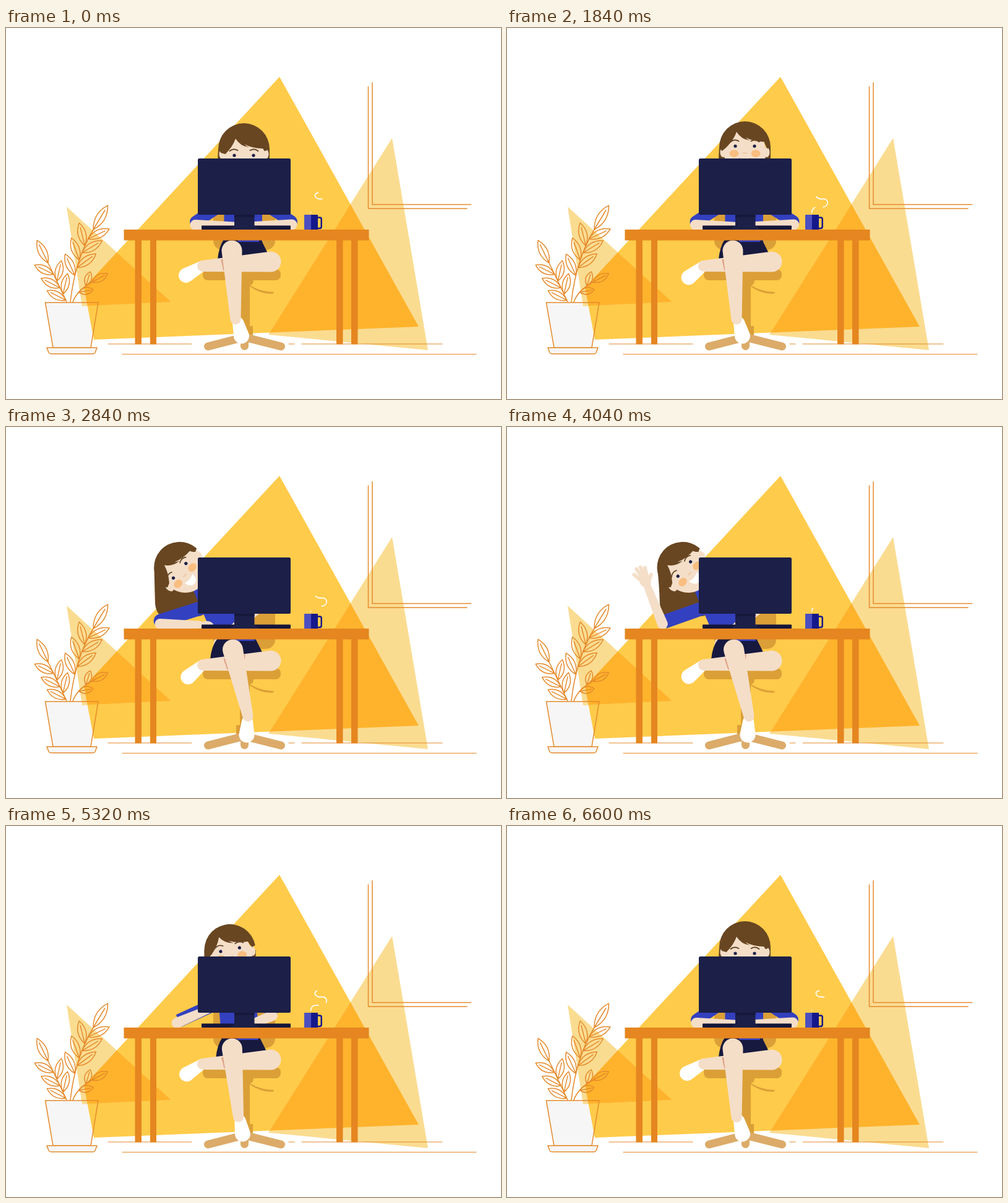
Animation, 800 px wide and 600 px high, one loop 6640 ms. Source, as an HTML page:

```html
<!DOCTYPE html>
<html lang="en">
<head>
<meta charset="utf-8">
<title>At the desk</title>
<style>
html, body { margin: 0; width: 100%; height: 100%; overflow: hidden; background: #fff; }
svg { display: block; width: 800px; height: 600px; }
.line { fill: none; stroke: #e58a2b; stroke-width: 1.5; stroke-linecap: round; stroke-linejoin: round; }
</style>
</head>
<body>
<svg viewBox="0 0 800 600">
  <defs><clipPath id="big"><path d="M442 79 667 483 142 504 126 420Z"/></clipPath></defs>

  <path fill="#f6f6f6" d="M63.5 444H149L137 517H76Z"/>
  <path fill="#ffcb4a" d="M442 79 667 483 142 504 126 420Z"/>
  <path fill="#fadc91" d="M624 178 682 521 424 496ZM98 289 267 443 123 450Z"/>
  <path fill="#ffb32c" clip-path="url(#big)" d="M624 178 682 521 424 496ZM98 289 267 443 123 450Z"/>

  <g class="line">
    <path d="M585.5 95V292H745M592 88.5V285.5H751.5"/>
    <path stroke-width="1.2" d="M188 527.5H760M165 511H300M457 511H466M478 511H705"/>
    <path d="M63.5 444H149L137 517H76Z"/>
    <path fill="#f6f6f6" d="M66 517H147L144 525Q143 527 141 527H73Q70 527 69 525Z"/>
    <g id="plant"></g>
  </g>

  <rect x="335" y="280" width="100" height="79" rx="15" fill="#db9f37"/>
  <g id="body"></g>
  <g fill="#db9f37">
    <rect x="318" y="390" width="126" height="18" rx="8"/>
    <path d="M378 400H394V408H400Q400 415 394 416Q412 427 433 427L432 429.5Q412 431 394 418V482H399V497H372V482H378Z"/>
  </g>
  <path fill="none" stroke="#dcab69" stroke-width="13" stroke-linecap="round" d="M326.5 515 385 500 444.5 515M385.5 502V514.5"/>
  <g id="legs"></g>

  <path fill="#e58620" d="M190.5 326H586.5V343.5H568.5V511.5H558V343.5H544.5V511.5H534V343.5H243V511.5H233V343.5H219V511.5H208.5V343.5H190.5Z"/>
  <rect x="316" y="319.5" width="144" height="6.5" rx="1" fill="#14163a"/>
  <path fill="#1c1f47" d="M369 300H401.5V320L410 326H361L369 320Z"/>
  <path fill="#16183c" d="M369 302H401.5V306H369Z"/>
  <rect x="310" y="211" width="150" height="91" rx="2.5" fill="#1c1f47"/>
  <path fill="#4b4fc0" d="M482 302H493V326H482Z"/>
  <path fill="#15188a" d="M493 302H504V326H493Z"/>
  <path fill="none" stroke="#15188a" stroke-width="2.5" d="M503 306.5H507Q509.7 306.5 509.7 309V321Q509.7 324 507 324H503"/>
  <g id="steam" fill="none" stroke="#fffaf0" stroke-width="1.8" stroke-linecap="round"></g>
</svg>
<script>
const LOOP = 6640, SKIN = '#f4dec8', HAIR = '#684621', BLUE = '#3340bf', NAVY = '#17193f';
const $ = id => document.getElementById(id);
const mix = (a, b, p) => a + (b - a) * p;
const clamp = x => Math.min(1, Math.max(0, x));

function ease(t, from, to) {
  const x = clamp((t - from) / (to - from));
  return x * x * (3 - 2 * x);
}
// Rises to 1 between a and b, falls back to 0 between c and d
const hold = (t, a, b, c, d) => ease(t, a, b) - ease(t, c, d);
// 0 at the start of the loop, 1 halfway through each beat
const beat = (t, period) => (1 - Math.cos(2 * Math.PI * t / period)) / 2;

const stroke = (d, color, w, cap = 'round') =>
  `<path d="${d}" fill="none" stroke="${color}" stroke-width="${w}" stroke-linecap="${cap}"/>`;
const oval = (x, y, rx, ry, fill) => `<ellipse cx="${x}" cy="${y}" rx="${rx}" ry="${ry}" fill="${fill}"/>`;

// Tapered limb with round ends
function limb(x0, y0, r0, x1, y1, r1, fill) {
  const a = Math.atan2(y1 - y0, x1 - x0);
  const b = Math.acos((r0 - r1) / Math.hypot(x1 - x0, y1 - y0));
  const at = (x, y, r, s) => `${x + r * Math.cos(a + s * b)} ${y + r * Math.sin(a + s * b)}`;
  return `<path fill="${fill}" d="M${at(x0, y0, r0, 1)}A${r0} ${r0} 0 ${+(r0 > r1)} 1 ${at(x0, y0, r0, -1)}` +
    `L${at(x1, y1, r1, -1)}A${r1} ${r1} 0 ${+(r1 > r0)} 1 ${at(x1, y1, r1, 1)}Z"/>`;
}

function leaf(x, y, angle, size) {
  const w = 8 + size * .13;
  return `<path transform="translate(${x} ${y}) rotate(${angle})" d="M0 0Q${size / 2} ${w} ${size} 0Q${size / 2} ${-w} 0 0H${size * .8}"/>`;
}

// Curved stem: leaves alternate sides from `first` to `last`, one more at the tip
function stem([x0, y0], [cx, cy], [x1, y1], count, first, last, size, side) {
  const bend = (a, c, b, u) => mix(mix(a, c, u), mix(c, b, u), u);
  const place = (u, turn, len) => {
    const dx = mix(cx - x0, x1 - cx, u), dy = mix(cy - y0, y1 - cy, u);
    return leaf(bend(x0, cx, x1, u), bend(y0, cy, y1, u), Math.atan2(dy, dx) * 180 / Math.PI + turn, len);
  };
  let out = `<path d="M${x0} ${y0}Q${cx} ${cy} ${x1} ${y1}"/>` + place(1, 0, size * 1.2);
  for (let i = 0; i < count; i++) {
    out += place(mix(first, last, i / (count - 1)), i % 2 ? -38 * side : 38 * side, size);
  }
  return out;
}
$('plant').innerHTML =
  stem([104, 443], [111.5, 375], [141, 326], 6, .33, .85, 38, -1) +
  stem([98, 443], [85, 415], [68, 380], 5, .05, .73, 34, -1) +
  stem([108, 443], [115, 424], [139, 411], 2, .44, .78, 24, 1);

function head(x, y, lean, look, drift, smile) {
  const fx = lean * mix(-4, 1, drift), fy = 10 - 12 * look + 5 * lean;
  const h = (fy + 2) * .67;
  const pair = (dx, dy, rx, ry, fill) => oval(-dx, dy, rx, ry, fill) + oval(dx, dy, rx, ry, fill);
  const mouth = smile > .02
    ? `<path fill="#fff" d="M-10 19Q0 23 10 19Q9 ${mix(23, 32, smile)} 0 ${mix(23, 32, smile)}Q-9 ${mix(23, 31, smile)} -10 19Z"/>`
    : stroke('M-9 20Q0 25 9 20', '#c98a5a', 1.2);
  return `<g transform="translate(${x} ${y}) rotate(${-49 * lean})">` +
    pair(35, 8, 5, 8, SKIN) + oval(0, 8, 34, 37, SKIN) +
    `<g transform="translate(${fx} ${fy})">` +
    pair(17.5, 12, 7.5, 6, '#f9bd80') + pair(15.5, 0, 2.6, 2.6, '#1c1f47') +
    stroke('M-23 -7Q-17 -12 -10 -8M10 -8Q17 -12 23 -7', '#5a3c1c', 1.7) +
    stroke('M-3 11Q0 12 3 11', '#e9b48c', 1.2) + mouth + '</g>' +
    `<path fill="${HAIR}" d="M-41.5 0A41.5 42 0 0 1 41.5 0L36 2Q33 ${h - 3} 31 ${h - 9}` +
    `Q14 ${h - 9} 1 ${h - 16}Q4 ${h - 13} 8 ${h - 11}Q-6 ${h - 13} -13.5 ${h - 25}Q-18 ${h - 12} -30 ${h}L-37 6Z"/></g>`;
}

function forearm(x, y, angle, side, hand) {
  const fingers = hand
    ? stroke('M76 -5 91 -13M78 -2 98 -6M78 2 98.5 1M78 5 95 7.5M70 3 81 12.5', SKIN, 5.8) : '';
  return `<g transform="translate(${x} ${y}) scale(${side} 1) rotate(${angle})">` +
    limb(0, 0, 8.5, 64, 0, 6, SKIN) + oval(75, 0, 11, hand ? 9 : 6, SKIN) + fingers + '</g>';
}

function drawBody(t, lean) {
  const headLean = hold(t, 1980, 2560, 4920, 5500);
  const armLean = hold(t, 1960, 2560, 4960, 5720);
  const look = hold(t, 600, 1250, 5400, 6000);
  const rise = 3 * hold(t, 560, 1050, 5700, 6600);
  const drift = ease(t, 2900, 4600);
  const smile = hold(t, 2450, 2750, 4650, 4900);
  const raise = hold(t, 3400, 3800, 4960, 5480);
  const m = (a, b) => mix(a, b, lean), arm = (a, b) => mix(a, b, armLean);

  const x = mix(384.5, mix(281, 285.5, drift), headLean);
  const y = mix(196 - rise, 227.5, headLean);

  // Long hair behind the shoulders hangs straight down
  const bx = mix(342, mix(241, 249, drift), headLean), by = m(296, 306);
  const hair = `<path fill="${HAIR}" d="M${x - 41.5} ${y}Q${bx - 1} ${y + 25} ${bx} ${by - 20}Q${bx + 2} ${by - 4} ${bx + 10} ${by - 1}` +
    `L${x + 30} ${by}Q${x + 41.5} ${by} ${x + 41.5} ${by - 16}V${y}Z"/>`;
  const torso = `<path fill="${BLUE}" d="M${m(353, 300)} 258H${m(414, 356)}L${m(414, 400)} 346H${m(352, 338)}Z"/>`;

  const spread = rise / 2 * (1 - armLean);
  const elbow = arm(306, 249 + 3 * drift) - spread;
  const wave = 1 - raise * (114 - 16 * beat(t - 4080, 440));
  const up = raise > .03;
  const arms =
    stroke(`M${arm(423, 385)} ${arm(288, 275)}L${arm(461, 402) + spread} ${arm(313, 285)}`, BLUE, 20) +
    forearm(arm(462, 402) + spread, arm(318, 297), arm(1, 40), -1, false) +
    stroke(`M${arm(345, 335)} ${arm(288, 286.5)}L${elbow + (up ? 3 : 1)} ${up ? 315 : 313.5}`, BLUE, arm(20, 22.5), up ? 'butt' : 'round') +
    forearm(elbow, 318.5, wave, 1, up);

  return hair + torso + head(x, y, headLean, look, drift, smile) + arms;
}

function drawLegs(t, lean) {
  const m = (a, b) => mix(a, b, lean), tap = beat(t, LOOP / 6);
  return `<path fill="${NAVY}" d="M${m(342, 330)} ${m(374, 376)}Q${m(344, 332)} 354 ${m(352, 342)} 342H${m(412, 403)}L${m(424, 415)} 366L${m(380, 370)} 376Z"/>` +
    stroke(`M${m(375, 368)} 344.5H${m(409, 402)}`, BLUE, 3, 'butt') +
    limb(317, 385, 8.5, 291 + 3.5 * tap, 400 + 4.5 * tap, 12, '#fff') +
    limb(428, 378, 16.5, 318, 385, 9, SKIN) +
    stroke(`M${m(349, 353)} 374L${m(353, 359)} 392M${m(378, 385)} 368L${m(378, 384)} 376`, '#dfa085', 3.5, 'butt') +
    limb(m(375, 390), 476, 9, m(380.5, 389), 498, 12.5, '#fff') +
    limb(m(365, 366.5), 360, 16.5, m(371, 391), m(471, 468), 8.5, SKIN);
}

// A wisp rises along one curl: its tip leads, its end follows
function wisp(t, start) {
  const age = (t - start + LOOP) % (LOOP / 2);
  const tip = clamp(age / 1450), end = clamp((age - 750) / 1400);
  if (tip === 0 || end === 1) return '';
  return `<path pathLength="1" stroke-dasharray="0 ${end} ${tip - end} 2" ` +
    'd="M492.5 298Q493 293 497 290.5Q499 289.5 508 290C521 290 521 276 511 276.5L506 276.5C498 275 497 267 504.5 266.5"/>';
}

function draw(t) {
  const lean = hold(t, 1960, 2560, 4700, 5600);
  $('body').innerHTML = drawBody(t, lean);
  $('legs').innerHTML = drawLegs(t, lean);
  $('steam').innerHTML = wisp(t, 600) + wisp(t, 1620);
}

const begin = performance.now();
function frame() {
  draw((performance.now() - begin) % LOOP);
  requestAnimationFrame(frame);
}
frame();
</script>
</body>
</html>
```
